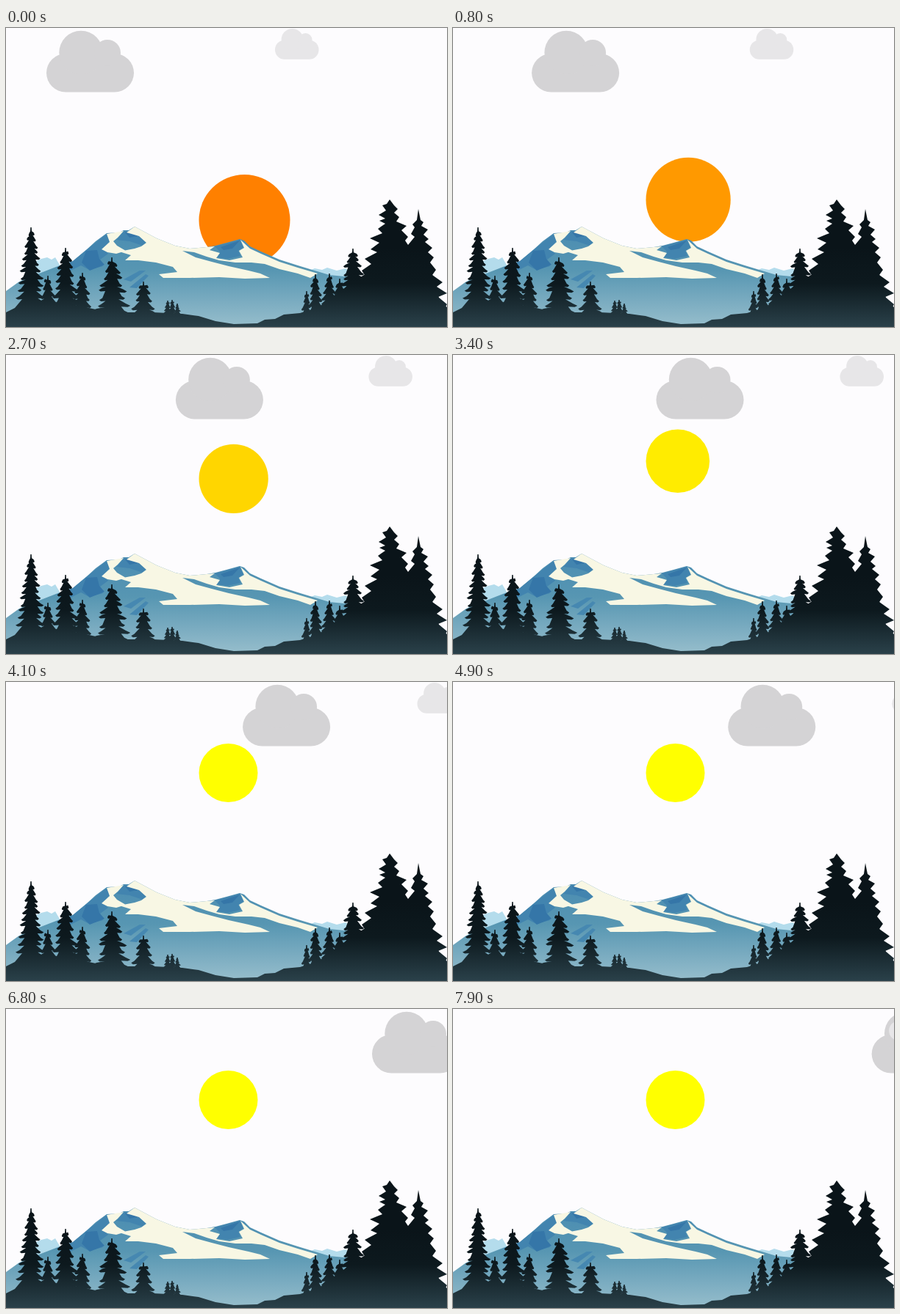
Animation, 600 px wide and 408 px high, one loop 8000 ms. Source, as an HTML page:

```html
<!DOCTYPE html>
<html lang="en">
<head>
<meta charset="utf-8">
<title>Sunrise over the mountains</title>
<style>
html, body { margin: 0; width: 100%; height: 100%; overflow: hidden; background: #fdfcfe; }
svg { display: block; width: 100%; height: 100%; }
</style>
</head>
<body>
<svg viewBox="0 0 600 408">
  <defs>
    <linearGradient id="slope" gradientUnits="userSpaceOnUse" x1="0" y1="270" x2="0" y2="404">
      <stop offset="0" stop-color="#4a8cb2"/>
      <stop offset=".45" stop-color="#5796b2"/>
      <stop offset="1" stop-color="#94bccb"/>
    </linearGradient>
    <linearGradient id="dark" gradientUnits="userSpaceOnUse" x1="0" y1="300" x2="0" y2="408">
      <stop offset="0" stop-color="#0a1419"/>
      <stop offset=".45" stop-color="#0d191e"/>
      <stop offset="1" stop-color="#2a414a"/>
    </linearGradient>
    <g id="cloud">
      <rect y="31" width="119" height="52.5" rx="26.2"/>
      <circle cx="47" cy="29.5" r="29.7"/>
      <circle cx="83" cy="30" r="18"/>
    </g>
  </defs>

  <use id="big" href="#cloud" fill="#d4d3d5"/>
  <use id="small" href="#cloud" fill="#e7e6e8"/>
  <circle id="sun"/>

  <!-- far ridges -->
  <path fill="#b4dcec" d="M20 345L40 318L48 315L56 313L62 316L67 313L74 325ZM408 333L420 328L430 330L437 327L450 331L462 328L478 340L470 352L425 345Z"/>
  <!-- main range -->
  <path fill="url(#slope)" d="M0 359L18 346L45 335L68 326L91 318L109 303L122 291L137 280L154 279L160 276L167 276L175 271L190 279L205 287L230 297L250 301L273 299L285 297L300 293L318 288L324 290L332 298L347 305L372 316L397 324L420 331L440 337L470 340L500 345V408H0Z"/>
  <!-- shaded facets -->
  <path fill="#4284af" d="M91 318L109 303L137 281L143 288L132 301L139 308L128 316L132 325L113 330L102 324L88 331L68 327ZM160 278L176 275L191 291L186 297L168 291L150 289ZM284 298L318 289L323 299L316 304L319 311L302 315L287 313L291 305Z"/>
  <path fill="#3576a8" d="M109 304L124 303L127 315L134 323L114 331L103 320ZM292 299L318 290L308 301L296 303ZM162 279L175 275L179 284L168 286Z"/>
  <path fill="#4688b1" d="M160 343L182 331L190 331L170 346ZM168 354L190 336L194 338L178 355Z"/>
  <!-- snow -->
  <path fill="#f8f7e4" d="M137 281L160 277L152 286L146 291L151 297L163 304L150 308L138 306L130 302L141 292ZM164 279L175 271L190 279L205 287L230 297L250 301L273 299L284 298L277 303L291 307L286 314L304 317L322 313L317 304L324 300L319 289L332 301L347 308L372 319L397 327L424 335L414 341L397 335L372 329L352 322L334 320L312 320L290 317L273 312L256 306L240 304L258 313L280 319L303 325L330 331L346 335L359 341L325 342L290 340L250 341L214 341L208 336L233 333L227 326L204 320L180 317L162 317L170 310L154 305L175 301L184 298L191 293L181 284Z"/>

  <g id="woods" fill="url(#dark)">
    <path d="M0 388L12 382L22 370L50 372L70 376L95 378L122 384L165 388L200 388L240 390L262 393L285 400L310 404L342 403L352 398L366 397L378 391L400 389L425 381L445 366L470 348L490 335L580 336L590 372L600 381V408H0Z"/>
    <path d="M522 234L518 240L512 242L517 249L507 255L516 260L508 263L516 267L506 274L512 280L495 287L508 293L496 302L505 306L488 315L497 322L484 331L490 340L474 350V388H594L600 377L588 367L600 362L586 353L594 347L580 337L585 330L577 320L582 313L574 306L580 300L570 292L575 288L568 282L574 275L565 270L568 265L564 262L561 247L559 262L553 268L556 272L551 281L556 285L547 296L543 290L547 285L538 276L545 270L531 264L535 258L528 252L533 247L528 242Z"/>
  </g>
</svg>
<script>
const $ = id => document.getElementById(id);

let seed = 7;
const rand = () => (seed = seed * 16807 % 2147483647) / 2147483647;

// One ragged side of a fir: drooping branch tips alternate with notches.
function side(x, top, base, width, dir) {
  const tiers = Math.max(4, Math.round((base - top) / 9));
  const step = (base - top) / tiers;
  const points = [[x + dir, top + step * .6]];
  for (let i = 1; i <= tiers; i++) {
    const reach = width * (i / tiers) ** .62 * (.78 + .36 * rand());
    const y = top + (i + .5 * rand() - .25) * step;
    points.push([x + dir * reach * .75, y - step * .3],
                [x + dir * reach, y],
                [x + dir * reach * .85, y + step * .2],
                [x + dir * reach * .5, y + step * .15]);
  }
  return points;
}

function addTree(x, top, base, width) {
  const tree = document.createElementNS('http://www.w3.org/2000/svg', 'polygon');
  const left = side(x, top, base, width, -1);
  const right = side(x, top, base, width, 1);
  tree.setAttribute('points', [[x - .7, top], ...left, ...right.reverse(), [x + .7, top]].join(' '));
  $('woods').append(tree);
}

[
  [34, 272, 376, 20], [57, 338, 385, 13], [81, 300, 384, 20], [104, 334, 387, 16],
  [144, 313, 388, 25], [187, 346, 390, 17], [220, 372, 390, 6], [226, 371, 390, 6],
  [233, 376, 390, 5], [409, 359, 390, 8], [421, 336, 390, 12], [440, 335, 385, 13],
  [454, 342, 380, 12], [472, 301, 370, 22]
].forEach(tree => addTree(...tree));

const LOOP = 8000, TICK = 100, RISE = 4, TURN = 666;

function draw(now) {
  const t = Math.floor(now % LOOP / TICK) * TICK / 1000;
  const rise = Math.min(t / RISE, 1);
  const r = 62 - 22 * rise;
  const sun = $('sun');
  sun.setAttribute('cx', 262.5 + r);
  sun.setAttribute('cy', 200 - 116 * rise + r);
  sun.setAttribute('r', r);
  sun.setAttribute('fill', `rgb(255,${Math.round(128 + 127 * rise)},0)`);

  $('big').setAttribute('transform', `translate(${55 + 65.15 * t} 4)`);
  // The small cloud drifts off stage, turns and comes back.
  const x = TURN - Math.abs(TURN - 366 - 47.2 * t);
  $('small').setAttribute('transform', `translate(${x} 1) scale(.5)`);
  requestAnimationFrame(draw);
}
draw(performance.now());
</script>
</body>
</html>
```
